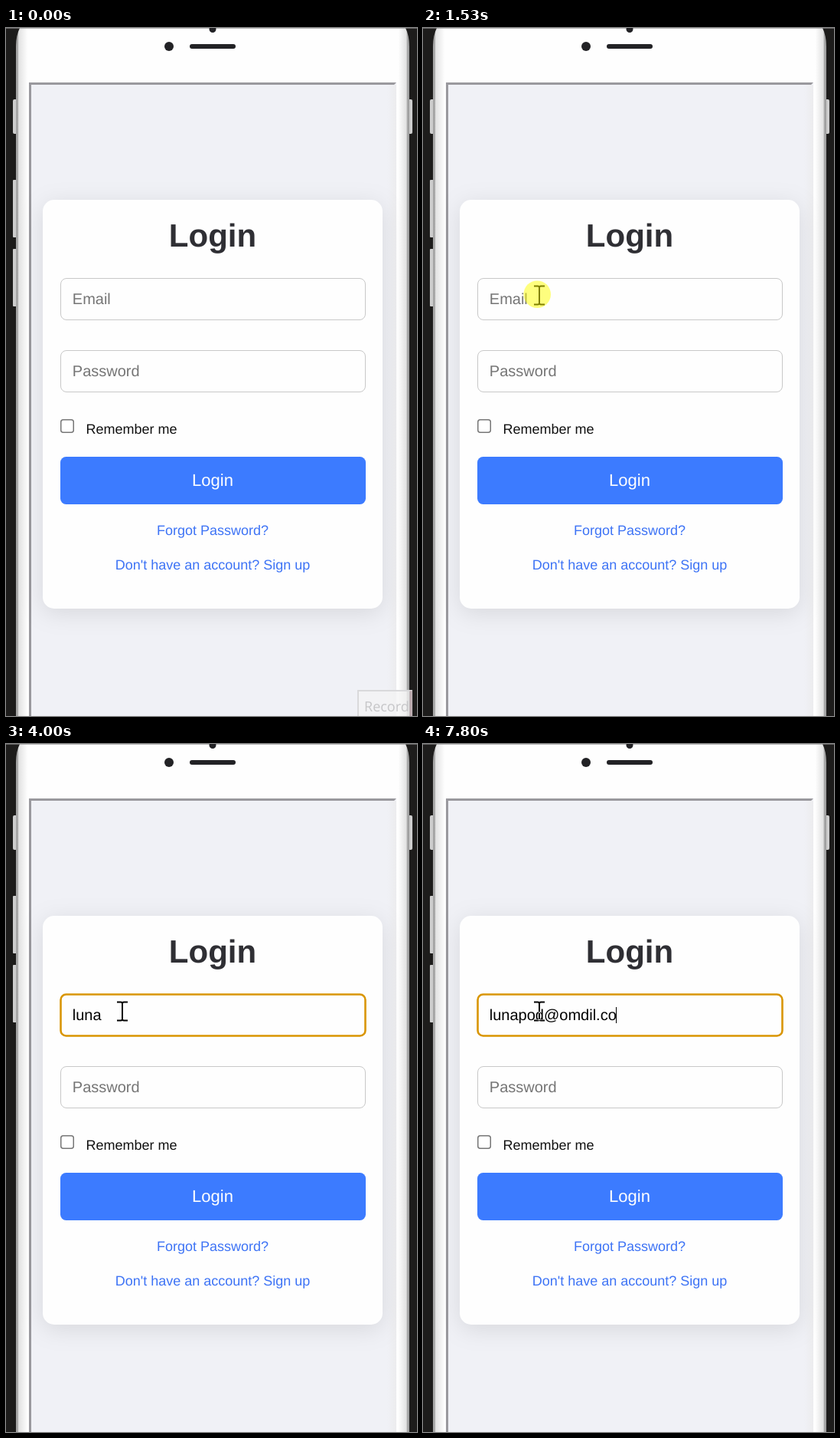
An HTML page for the animation above (8000 ms loop, 537 by 897 pixels).

```html
<!DOCTYPE html>
<html lang="en">
<head>
<meta charset="utf-8">
<title>Login form</title>
<style>
  html, body { margin: 0; width: 100%; height: 100%; overflow: hidden; background: #1d1c1b; }
  svg { display: block; width: 537px; height: 897px; isolation: isolate;
        font-family: "Liberation Sans", Arial, sans-serif; text-rendering: geometricPrecision; }
  .field { fill: #fefefe; stroke: #c8c8c8; }
  .entry { font-size: 20px; }
  .hint { fill: #757575; }
  .small { font-size: 18px; }
  .mid { text-anchor: middle; }
  .link { fill: #3d73f5; }
  .card { filter: drop-shadow(0 6px 15px rgba(0, 0, 0, .1)); }
  #beam { mix-blend-mode: difference; }
</style>
</head>
<body>
<svg viewBox="0 0 537 897">
  <defs>
    <linearGradient id="body">
      <stop offset="0" stop-color="#a2a2a2"/>
      <stop offset=".005" stop-color="#aaa"/>
      <stop offset=".007" stop-color="#e2e2e2"/>
      <stop offset=".03" stop-color="#fefefe"/>
      <stop offset=".972" stop-color="#fefefe"/>
      <stop offset=".992" stop-color="#e2e2e2"/>
      <stop offset=".995" stop-color="#aaa"/>
      <stop offset="1" stop-color="#9a9a9a"/>
    </linearGradient>
    <linearGradient id="rim">
      <stop offset="0" stop-color="#f0f1f6"/>
      <stop offset="1" stop-color="#ececee"/>
    </linearGradient>
  </defs>

  <!-- phone -->
  <rect width="537" height="897" fill="#1d1c1b"/>
  <g fill="#cdcdcd">
    <rect x="9" y="93" width="8" height="45" rx="2"/>
    <rect x="9" y="198" width="8" height="75" rx="1"/>
    <rect x="9" y="288" width="8" height="75" rx="1"/>
    <rect x="522" y="93" width="9" height="45" rx="2"/>
  </g>
  <path d="M18 0Q13 10 13 24V897H527V24Q527 10 522 0Z" fill="url(#body)"/>
  <rect width="537" height="1" fill="#8f8f8f" opacity=".6"/>
  <g fill="#222225">
    <circle cx="270" cy="1.5" r="4.5"/>
    <circle cx="213" cy="24" r="6"/>
    <rect x="240" y="21" width="60" height="6" rx="3"/>
  </g>

  <!-- screen -->
  <rect x="30" y="71" width="480" height="826" fill="#f0f1f6"/>
  <rect x="498" y="74" width="12" height="823" fill="url(#rim)"/>
  <path d="M30 897V71H510L507 74H33V897Z" fill="#9a999e"/>
  <rect class="card" x="48" y="224" width="444" height="533" rx="15" fill="#fefefe"/>
  <text class="mid" x="270" y="285" font-size="42" font-weight="700" fill="#2f2f34">Login</text>

  <rect class="field" x="71.5" y="326.5" width="398" height="54" rx="7.5"/>
  <rect id="focus" x="71.5" y="326.5" width="398" height="54" rx="7" fill="none" stroke="#d99500" stroke-width="2.6"/>
  <text id="email" class="entry" x="86.8" y="360"></text>
  <rect id="caret" y="343" width="1" height="21"/>

  <rect class="field" x="71.5" y="420.5" width="398" height="54" rx="7.5"/>
  <text class="entry hint" x="86.8" y="454">Password</text>

  <rect x="71.75" y="510.75" width="16.5" height="16.5" rx="3" fill="#fff" stroke="#767676" stroke-width="1.5"/>
  <text class="small" x="104.5" y="529" fill="#111">Remember me</text>

  <rect x="71" y="559" width="399" height="62" rx="7.5" fill="#3c7bff"/>
  <text class="mid" x="270" y="597" font-size="22" fill="#fff">Login</text>
  <text class="small mid link" x="270" y="661">Forgot Password?</text>
  <text class="small mid link" x="270" y="706">Don't have an account? Sign up</text>

  <!-- recorder button -->
  <g id="record">
    <rect x="459" y="863" width="72" height="40" fill="#f4f4f5" fill-opacity=".75"/>
    <path d="M460 897V864H530" fill="none" stroke="#d9d9db" stroke-width="2"/>
    <path d="M529 864V897" stroke="#b98f98" stroke-width="3" opacity=".45"/>
    <text x="468" y="891" font-size="18" fill="#c6c6c8" font-family="'Open Sans', 'Noto Sans', sans-serif">Record</text>
  </g>

  <!-- pointer -->
  <path id="arrow" d="M0 0V19L4.5 15L7.5 22L10.5 20.7L7.5 14H13.5Z" fill="#fff" stroke="#000"/>
  <path id="beam" d="M-7-12H-2Q0-12 0-10Q0-12 2-12H7M0-11V11M-7 12H-2Q0 12 0 10Q0 12 2 12H7" fill="none" stroke="#fff" stroke-width="2"/>
  <circle id="glow" cx="149.2" cy="347.2" r="17.8" fill="#ff0" fill-opacity=".5"/>
</svg>
<script>
  const LOOP = 8000;
  const ADDRESS = "lunapod@omdil.co";
  const FOCUS = 1600;

  // one time per typed character
  const keys = [2590, 2920, 3200, 3450, 4070, 4270, 4400, 5200,
                5930, 6200, 6330, 6460, 6730, 7400, 7600, 7800];
  // spans in which the caret is blinked off
  const blinks = [[2060, 2590], [4000, 4070], [5000, 5200], [5730, 5930], [7260, 7400]];
  // pointer: time, x, y
  const path = [
    [70, 494, 886], [140, 452, 812], [200, 388, 700], [270, 312, 560], [340, 238, 440],
    [400, 180, 350], [470, 146, 308], [540, 138, 299], [600, 147, 332],
    [660, 152, 343], [740, 152, 345], [800, 152, 347], [870, 152, 348.5]
  ];

  const el = Object.fromEntries(
    [...document.querySelectorAll("svg [id]")].map(node => [node.id, node]));
  const show = (node, on) => node.setAttribute("visibility", on ? "visible" : "hidden");
  const within = (t, [from, to]) => t >= from && t < to;
  const overField = (x, y) =>
    x > 71 && x < 470 && (within(y, [326, 381]) || within(y, [420, 475]));

  function drawPointer(t) {
    const step = path.filter(p => p[0] <= t).pop();
    const [, x, y] = step || [0, 0, 0];
    const beam = overField(x, y);
    show(el.beam, step && beam);
    show(el.arrow, step && !beam);
    for (const node of [el.beam, el.arrow])
      node.setAttribute("transform", `translate(${x} ${y})`);
    show(el.glow, within(t, [940, FOCUS + 60]));
  }

  function drawEntry(t) {
    const count = keys.filter(k => k <= t).length;
    el.email.textContent = count ? ADDRESS.slice(0, count) : "Email";
    el.email.setAttribute("class", count ? "entry" : "entry hint");
    const width = count ? el.email.getComputedTextLength() : 0;
    el.caret.setAttribute("x", count ? Math.floor(86.8 + width) : 87);
    show(el.caret, t >= FOCUS && !blinks.some(span => within(t, span)));
    show(el.focus, t >= FOCUS);
  }

  function draw(t) {
    el.record.setAttribute("opacity", t < 70 ? 1 : t < 140 ? .5 : 0);
    drawPointer(t);
    drawEntry(t);
  }

  const start = performance.now();
  function tick() {
    draw((performance.now() - start) % LOOP);
    requestAnimationFrame(tick);
  }
  tick();
</script>
</body>
</html>
```
